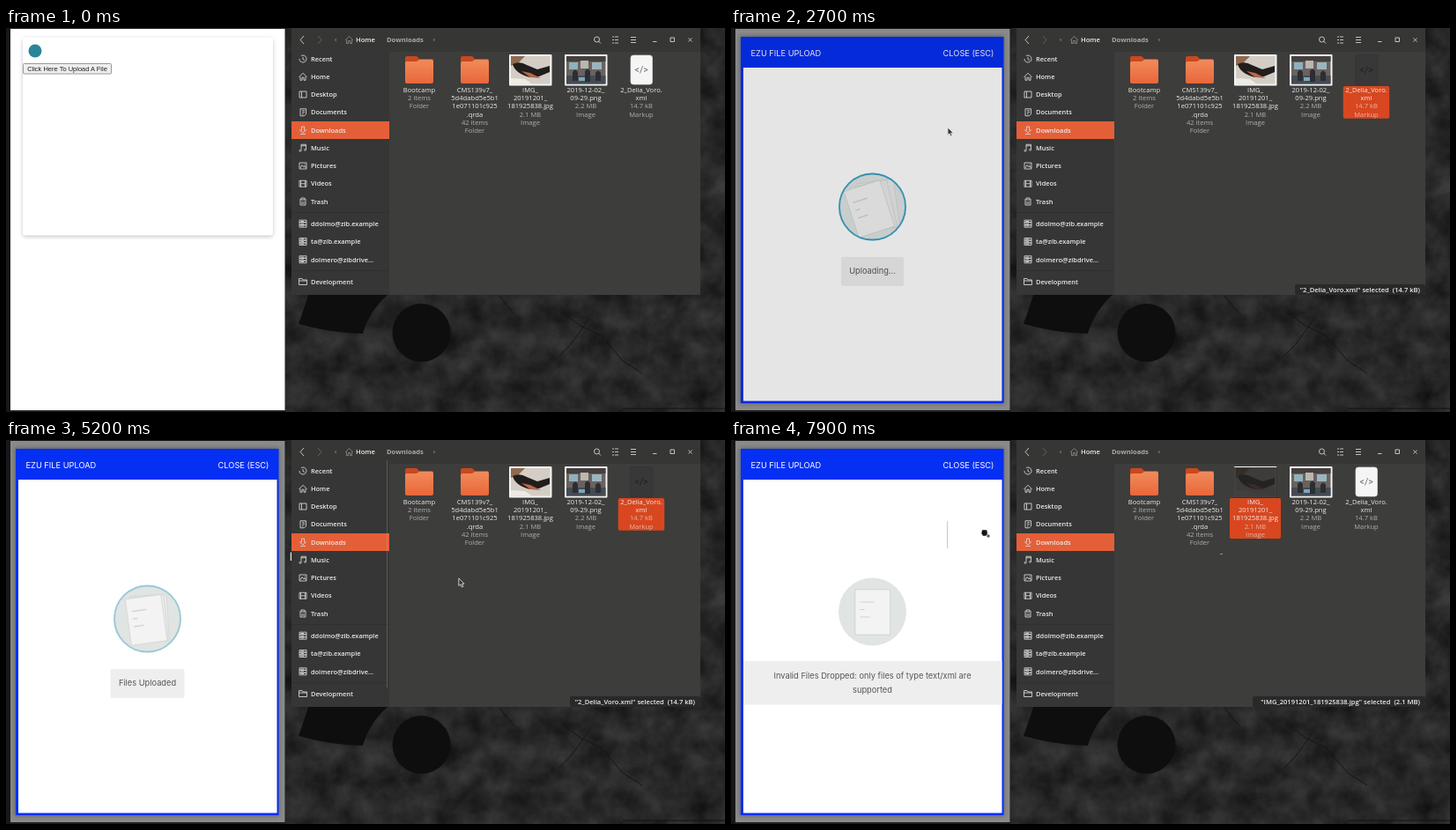
Recreate the animation shown at these times as an HTML page. Size 816x436 px, loop 8000 ms.

```html
<!DOCTYPE html>
<html lang="en">
<head>
<meta charset="utf-8">
<title>File upload by drag and drop</title>
<style>
  html, body { margin: 0; width: 100%; height: 100%; overflow: hidden; background: #161616; }
  svg { display: block; width: 816px; height: 436px; }
  text { white-space: pre; }
  .ui { font: 500 7.6px "Open Sans", "Noto Sans", sans-serif; fill: #ececec; }
  .web { font: 400 9.25px Inter, sans-serif; fill: #555; }
  .mid { text-anchor: middle; }
  .end { text-anchor: end; }
  .line { fill: none; stroke: #d4d4d4; stroke-width: .9; }
</style>
</head>
<body>
<svg id="stage" viewBox="0 0 816 436" xmlns="http://www.w3.org/2000/svg"></svg>
<script>
const LOOP = 8000, STEP = 100;
const ORANGE = '#d8471f', BLUE = '#052ff3';

// Visibility spans: pairs of start and end times in ms.
const FOCUS = '600 2300 6300 7500';
const XML_PICKED = '700 6300', IMG_PICKED = '6300 8000';
const DROP_HINT = '1400 2300 7000 7500';

const on = spans => `data-on="${spans}"`;
const off = spans => `data-off="${spans}"`;
const text = (x, y, s, cls = 'ui', attrs = '') =>
  `<text x="${x}" y="${y}" class="${cls}" ${attrs}>${s}</text>`;
const rect = (x, y, w, h, fill, attrs = '') =>
  `<rect x="${x}" y="${y}" width="${w}" height="${h}" fill="${fill}" ${attrs}/>`;
const path = (d, attrs = 'class="line"') => `<path d="${d}" ${attrs}/>`;
const group = (attrs, ...parts) => `<g ${attrs}>${parts.join('')}</g>`;

const defs = `<defs>
  <filter id="grunge" x="0" y="0" width="100%" height="100%" color-interpolation-filters="sRGB">
    <feTurbulence type="fractalNoise" baseFrequency=".035" numOctaves="5" seed="8"/>
    <feColorMatrix values=".2 0 0 0 .055  .2 0 0 0 .055  .2 0 0 0 .055  0 0 0 0 1"/>
  </filter>
  <filter id="soft" x="-10%" y="-10%" width="120%" height="120%"><feGaussianBlur stdDeviation="2"/></filter>
  <linearGradient id="folder" x1="0" y1="0" x2="0" y2="1">
    <stop stop-color="#f28a5a"/><stop offset="1" stop-color="#e8673a"/></linearGradient>
  <linearGradient id="glow" x1="0" y1="0" x2="0" y2="1">
    <stop offset=".5" stop-color="#f5b878" stop-opacity="0"/><stop offset="1" stop-color="#f5b878"/></linearGradient>
  <clipPath id="disc"><circle r="37.5"/></clipPath>
</defs>`;

const wallpaper = group('',
  rect(0, 0, 816, 436, '#222'),
  rect(317, 0, 499, 436, '#222', 'filter="url(#grunge)"'),
  rect(0, 0, 5, 436, '#171717'),
  path('M344 300Q338 320 332 336Q366 346 405 347Q412 322 433 303V300Z', 'fill="#0e0e0e"'),
  '<circle cx="471.500" cy="346" r="33" fill="#0e0e0e"/>',
  path('M630 322L652 338L676 350L700 378L722 392M662 330L640 360L628 372M560 304L578 326',
    'fill="none" stroke="#151515"'),
  path('M700 432H816', 'stroke="#111"'));

const page = group('',
  rect(5, 1, 311.5, 433, '#fff'),
  rect(19, 12, 284, 225, '#aaa', 'rx="4" filter="url(#soft)" opacity=".7"'),
  rect(19, 10.5, 284, 225, '#fff', 'rx="3"'),
  '<circle cx="33" cy="26" r="7.500" fill="#2b8598"/>',
  rect(19.5, 40.5, 100, 11.5, '#eee', 'stroke="#999" rx="1"'),
  text(69.5, 49.3, 'Click Here To Upload A File', 'mid', 'style="font:7.5px Liberation Sans,sans-serif" fill="#222"'));

const sidebarIcons = {
  Recent: 'M-4 0A4 4 0 1 0 -2-3.400M0-2V0.500L2 1.500',
  Home: 'M-4.500 0.500L0-4L4.500 0.500M-3 0V4H-1V1H1V4H3V0',
  Desktop: 'M-4-3.500H4V3.500H-4ZM-1.500-3.500V3.500',
  Documents: 'M-3-4H3.500V2L1.500 4H-3ZM-1-2H2M-1 0H2M-1 2H0.500',
  Downloads: 'M-1.500-4H1.500V0H3.500L0 3L-3.500 0H-1.500ZM-3 4.500H3',
  Music: 'M-2 3V-4H3.500V2M-2-2.500H3.500M-2 3A1 1 0 1 1-3 2M3.500 2A1 1 0 1 1 2.500 1',
  Pictures: 'M-4-3.500H4V3.500H-4ZM-3 2.500L-1-1L1 1.500L2 0L3.500 2.500M1.500-1.500H2.500',
  Videos: 'M-4-3.500H4V3.500H-4ZM-2.500-3.500V3.500M2.500-3.500V3.500M-2.500 0H2.500',
  Trash: 'M-4-2H4M-2-2V-4H2V-2M-3-1V4H3V-1M-1 0V3M1 0V3',
  server: 'M-4-4H4V-1.500H-4ZM-4-1.500H4V1.500H-4ZM-4 1.500H4V4H-4ZM-2.500-2.700H1M-2.500 0H1M-2.500 2.700H1',
  folder: 'M-4.500-3.500H-1L0-2H4.500V3.500H-4.500ZM-4.500-1H4',
};
const row = (y, name, icon = name, attrs = '') => group(attrs,
  path(sidebarIcons[icon], `class="line" transform="translate(337 ${y})"`),
  text(346, y + 2.7, name, 'ui', 'style="font-weight:600;font-size:7.4px"'));

const places = ['Recent', 'Home', 'Desktop', 'Documents', 'Downloads', 'Music', 'Pictures', 'Videos', 'Trash'];
const accounts = ['ddolmo@zib.example', 'ta@zib.example', 'dolmero@zibdrive…'];

const sidebar = group('',
  rect(324, 27, 111, 276, '#363636'),
  rect(324, 106, 111, 20, '#e45f38'),
  rect(324, 106, 111, 20, ORANGE, on(FOCUS)),
  ...places.map((name, i) => row(35 + i * 20.25, name)),
  path('M324 209.500H435M324 275.500H435', 'stroke="#2f2f2f"'),
  ...accounts.map((name, i) => row(222.2 + i * 20.3, name, 'server')),
  row(288, 'Development', 'folder', off('900 2300')),
  group(on('900 2300'),
    path(sidebarIcons.folder, 'fill="none" stroke="#da5630" transform="translate(337 288)"'),
    text(346, 290.7, 'New bookmark', 'ui', 'style="fill:#e25a32"')),
  rect(432, 23, 1, 258, '#b5b5b5', 'id="scrollbar"'));

const header = group('',
  rect(324, 0, 464, 27, '#363635'),
  path('M338 9L334 13.500L338 18'),
  path('M354 9L358 13.500L354 18', 'class="line" opacity=".3"'),
  path('M375 11.500L372.500 13.500L375 15.500ZM485 11.500L487.500 13.500L485 15.500Z', 'fill="#666"'),
  ...[[off, '#eee', '#aaa'], [on, '#aaa', '#fff']].map(([when, home, folder]) => group(when(FOCUS),
    path(sidebarIcons.Home, 'class="line" opacity=".5" transform="translate(389.500 13.500)"'),
    text(397, 16.4, 'Home', 'ui', `style="font-weight:600;fill:${home}"`),
    text(432, 16.4, 'Downloads', 'ui', `style="font-weight:700;fill:${folder}"`))),
  '<circle cx="670.500" cy="13" r="3" class="line"/>',
  path('M672.500 15L675 17.500M688 10H690M688 13.500H690M688 17H690M691 10H695M691 13.500H695M691 17H695M709 10.500H715M709 13.500H715M709 16.500H715M734 15.500H738.500M754 11H758.500V15.500H754Z'),
  `<circle cx="776.500" cy="13.500" r="6.300" fill="${ORANGE}" ${on(FOCUS)}/>`,
  path('M774.500 11.500L778.500 15.500M778.500 11.500L774.500 15.500'));

const folderIcon = cx => group(`transform="translate(${cx - 16} 31)"`,
  path('M2 1H13L16 4H30Q32 4 32 6V20H0V3Q0 1 2 1Z', 'fill="#c9481f"'),
  path('M0 9Q0 7 2 7H13L16 5H30Q32 5 32 7V30Q32 32 30 32H2Q0 32 0 30Z', 'fill="url(#folder)"'));

const petPhoto = group('transform="translate(571 30)"',
  rect(0, 0, 48.5, 35.5, '#f4f4f4', 'rx="1"'),
  rect(2, 2, 44.5, 31.5, '#d3cdc5'),
  path('M2 2H18L10 10L2 13Z', 'fill="#8e6a50"'),
  path('M4 11Q12 7 20 12L32 17L46 13V20L34 25L24 26Q7 22 4 11Z', 'fill="#211d1c"'),
  path('M14 19L24 21L36 27L24 26Z', 'fill="#b4674a"'),
  path('M2 27L18 28L26 33.500H2Z', 'fill="#eeeae4"'));

const officePhoto = group('transform="translate(634 30)"',
  rect(0, 0, 48.5, 35.5, '#f4f4f4', 'rx="1"'),
  rect(2, 2, 44.5, 31.5, '#6a625e'),
  rect(2, 2, 44.5, 6, '#45403e'),
  rect(5, 9, 10, 8, '#8fb0bd'), rect(18, 7, 9, 9, '#bab6b0'), rect(31, 9, 11, 8, '#9ab5c0'),
  rect(2, 24, 44.5, 9.5, '#454b52'),
  path('M9 30V20Q12 15 15 20V30ZM23 31V19Q26 14 29 19V31ZM35 30V21Q38 16 41 21V30Z', 'fill="#2b2e33"'),
  rect(16, 26, 7, 4, '#79a6bd'));

const xmlIcon = (ink = '#666') => rect(709, 31, 24.5, 33, '#f5f5f5', 'rx="3" stroke="#e1e1e1" stroke-width=".7"') +
  text(721.2, 51, '&lt;/&gt;', 'mid', `style="font:10.5px Roboto,sans-serif" fill="${ink}"`);

const label = (cx, names, details) => [...names, ...details].map((s, i) =>
  text(cx, 73 + i * 9.2, s, 'ui mid', i < names.length ? '' : 'fill-opacity=".65"')).join('');
const highlight = (cx, w, lines, attrs = '') => rect(cx - w / 2, 66, w, lines * 9.2, ORANGE, `rx="2" ${attrs}`);

const xmlLabel = label(721, ['2_Delia_Voro.', 'xml'], ['14.7 kB', 'Markup']);
const imgLabel = label(595, ['IMG_', '20191201_', '181925838.jpg'], ['2.1 MB', 'Image']);

const files = group('',
  rect(435, 27, 353, 276, '#3d3d3c'),
  folderIcon(469), label(469, ['Bootcamp'], ['2 items', 'Folder']),
  folderIcon(532), highlight(532, 58, 6, on('6500 6800')),
  label(532, ['CMS139v7_', '5d4dabd5e5b1', '1e071101c925', '.qrda'], ['42 items', 'Folder']),
  petPhoto, rect(571, 31, 49, 35, '#262524', `opacity=".86" ${on('7500 8000')}`),
  highlight(595, 58, 5, on(IMG_PICKED)), imgLabel,
  officePhoto, label(658, ['2019-12-02_', '09-29.png'], ['2.2 MB', 'Image']),
  xmlIcon(), rect(708, 30, 26.5, 35, '#343434', `opacity=".98" rx="3" ${on('2300 6300')}`),
  text(721.2, 51, '&lt;/&gt;', 'mid', `style="font:10.5px Roboto,sans-serif" fill="#202020" ${on('2300 6300')}`),
  highlight(721, 52.5, 4, on(XML_PICKED)), xmlLabel,
  ...[[640, '2_Delia_Voro.xml', '14.7 kB', XML_PICKED], [592, 'IMG_20191201_181925838.jpg', '2.1 MB', IMG_PICKED]]
    .map(([x, name, size, spans]) => group(on(spans),
      rect(x, 291, 788 - x, 12, '#292929', 'rx="2"'),
      text(782, 299.7, `"${name}" selected  (${size})`, 'ui end', 'style="font-weight:600"'))),
  rect(555, 129, 3, .8, '#aaa', on('6500 8000')));

const button = (s, w, spans) => group(on(spans),
  rect(160.5 - w / 2, 260, w, 33, '#eee', 'rx="2"'),
  text(160.5, 279.2, s, 'web mid'));

const sheet = i => group(`class="sheet" data-index="${i}"`,
  rect(-19.5, -25, 39.5, 51, i ? '#eaeaea' : '#f3f3f3', 'stroke="#d2d4d4" stroke-width=".7"'),
  i ? '' : path('M-14-11H2M-14-2.500H-9M-14 6H-3', 'stroke="#cfd1d1" stroke-width="1.200"') +
    rect(-19.5, -25, 39.5, 51, 'url(#glow)', 'id="warmth"'));

const dialog = group('id="dialog"',
  rect(5, 0, 312, 434.5, '#000', 'opacity=".46"'),
  rect(10, 9, 300, 418, '#123', 'filter="url(#soft)" opacity=".35"'),
  rect(11, 10, 298.5, 416, BLUE),
  rect(14, 45, 293.5, 378.5, '#fff'),
  path('M20 51.500H119.500V46', `fill="none" stroke="#b9a6a6" ${on('1500 2100')}`),
  text(22.5, 31.5, 'EZU FILE UPLOAD', 'web', 'style="fill:#fff"'),
  text(298.5, 31.5, 'CLOSE (ESC)', 'web end', 'style="fill:#fff"'),
  button('Drop Files Here to Upload', 133, DROP_HINT),
  button('Uploading...', 71, '2300 4800'),
  button('Files Uploaded', 84, '4800 7000'),
  group(on('7500 8000'),
    rect(14, 251, 293.5, 49.5, '#eee'),
    text(160.5, 271.3, 'Invalid Files Dropped: only files of type text/xml are', 'web mid'),
    text(160.5, 287.3, 'supported', 'web mid'),
    path('M245.500 92V123', 'stroke="#bbb" stroke-width=".8"')),
  group('id="badge"', '<circle r="38.500" fill="#e0e4e3"/>',
    group('clip-path="url(#disc)"', sheet(2), sheet(1), sheet(0)),
    '<circle id="ring" r="37.500" fill="none" stroke="#3aa3c4" stroke-width="1.800"/>'),
  rect(11, 10, 298.5, 416, '#000', 'id="shade"'));

const ghosts = group(`id="xmlGhost" ${on('900 2200')}`, xmlIcon('#86a9cc'), highlight(721, 52.5, 4), xmlLabel) +
  group(`id="imgGhost" ${on('6300 7500')}`, petPhoto, highlight(595, 58, 5), imgLabel);

const cursors = group(`id="arrow" ${on('500 900 2200 6300')}`,
    path('M0 0V8.500L2 6.800L3.400 10L5 9.300L3.600 6.200H6.200Z', 'fill="#333" stroke="#ddd" stroke-width=".9"')) +
  group(`id="hand" ${on('900 2200 6300 8000')}`,
    path('M-3-3H2L3-1V2L1 4H-2L-4 1Z', 'fill="#151515" stroke="#ddd" stroke-width=".5"') +
    path('M4 2V6M2 4H6', 'stroke="#333"'));

document.getElementById('stage').innerHTML = defs + wallpaper + page +
  header + sidebar + files + dialog + rect(322.8, 127.5, 1.2, 9.5, '#eee', on('3200 7200')) + ghosts + cursors;

// Keyframes: [time, ...values], linear in between.
const tracks = {
  dialog: [[1300, 0], [1400, .4], [1500, .85], [1600, 1]],
  shade: [[2100, 0], [2400, .1], [4700, .1], [4900, 0]],
  fan: [[1400, 0], [1600, 1], [4800, 1], [5500, 0], [7000, 0], [7200, .8], [7500, .8], [7800, 0]],
  warmth: [[3700, 0], [4600, .5], [4900, 0]],
  scrollbar: [[3200, 0], [3400, 1], [4700, 1], [5200, .3], [5500, 0]],
  arrow: [[500, 640, 150], [800, 745, 48], [2200, 249, 113], [2700, 246, 113], [2900, 250, 115], [3700, 513, 157],
    [5500, 514, 157], [6100, 608, 40]],
  hand: [[900, 749, 50], [1300, 374, 100], [1600, 263, 111], [2000, 263, 111], [2200, 250, 113],
    [6300, 613, 43], [6600, 573, 50], [7200, 288, 105]],
  xmlGhost: [[900, 0, 0], [1300, -375, 50], [1600, -486, 61], [2000, -486, 61], [2200, -499, 63]],
  imgGhost: [[6300, 0, 0], [6600, -120, 21], [7200, -325, 62]],
};

function sample(name, t) {
  const keys = tracks[name];
  const next = keys.findIndex(key => key[0] > t);
  if (next === 0) return keys[0].slice(1);
  if (next < 0) return keys[keys.length - 1].slice(1);
  const a = keys[next - 1], b = keys[next];
  const k = (t - a[0]) / (b[0] - a[0]);
  return a.slice(1).map((v, i) => v + (b[i + 1] - v) * k);
}

const byId = id => document.getElementById(id);
const move = (el, x, y, rest = '') => el.setAttribute('transform', `translate(${x} ${y}) ${rest}`);
const within = (spans, t) => spans.some((start, i) => i % 2 === 0 && t >= start && t < spans[i + 1]);
const switches = [...document.querySelectorAll('[data-on], [data-off]')].map(el => ({
  el,
  spans: (el.dataset.on || el.dataset.off).split(' ').map(Number),
  shown: 'on' in el.dataset,
}));
const sheets = document.querySelectorAll('.sheet');

function render(t) {
  for (const { el, spans, shown } of switches) {
    el.style.display = within(spans, t) === shown ? '' : 'none';
  }
  for (const id of ['dialog', 'shade', 'warmth', 'scrollbar']) byId(id).style.opacity = sample(id, t)[0];
  for (const id of ['arrow', 'hand', 'xmlGhost', 'imgGhost']) move(byId(id), ...sample(id, t));

  const [fan] = sample('fan', t);
  byId('ring').style.opacity = fan;
  move(byId('badge'), 160.5, t >= 7500 ? 195 : 203);
  for (const el of sheets) {
    const i = +el.dataset.index;
    move(el, fan * (i * 5 - 4), fan * (2 - i * 2), `rotate(${fan * (i * 5 - 18)}) scale(${1 + fan * .08})`);
  }
}

let last = -1;
function tick() {
  const t = Math.floor(performance.now() % LOOP / STEP) * STEP;
  if (t !== last) render(last = t);
  requestAnimationFrame(tick);
}
tick();
</script>
</body>
</html>
```
